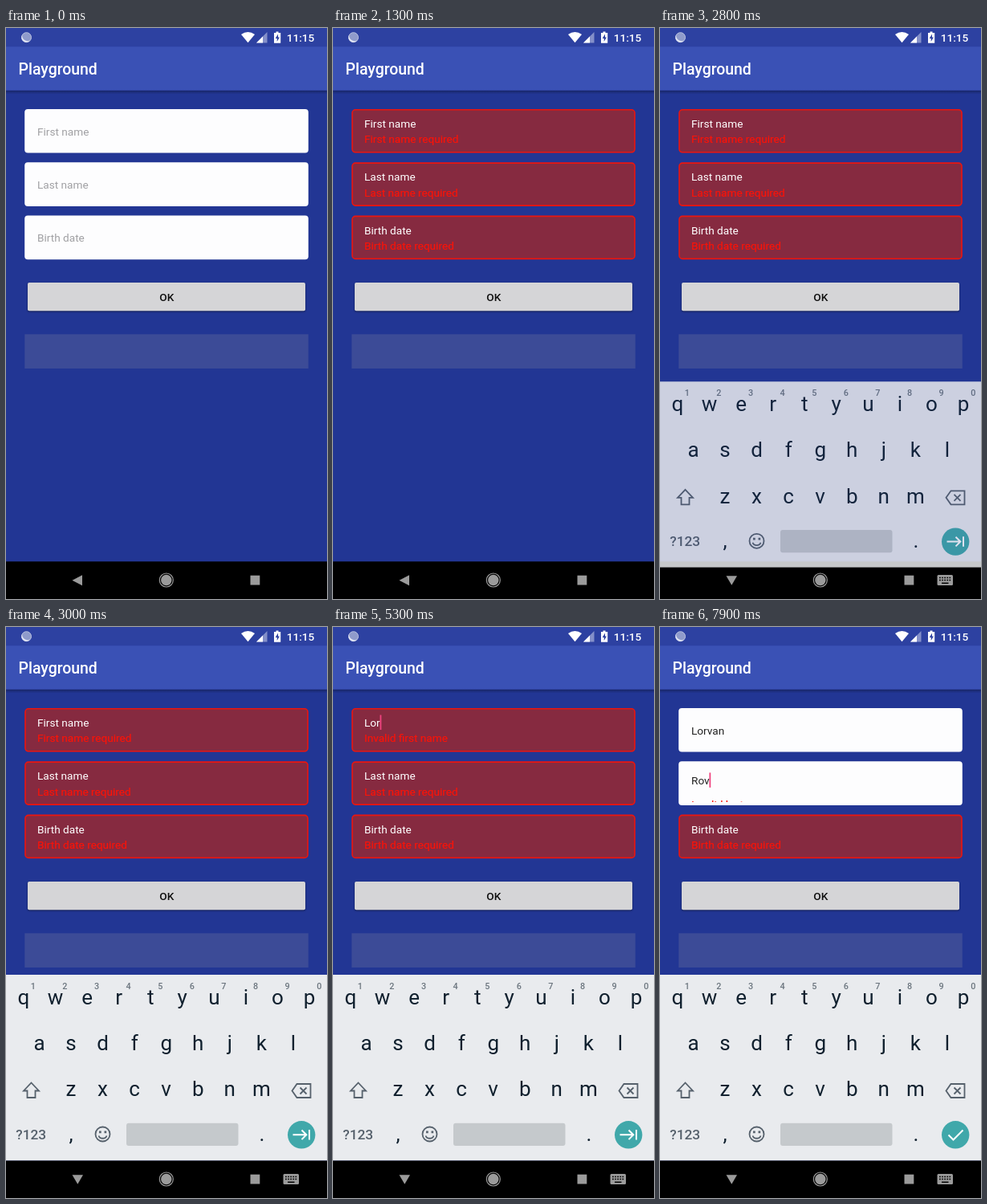
These frames come from a looping animation (400 by 711 pixels, 8000 ms). An HTML page:

```html
<!DOCTYPE html>
<html lang="en">
<head>
<meta charset="utf-8">
<title>Form validation</title>
<style>
html, body { margin: 0; width: 100%; height: 100%; overflow: hidden; background: #223694; }
svg { display: block; width: 100vw; height: 100vh; font-family: Roboto, sans-serif; font-size: 13.62px; }
.mid { text-anchor: middle; }
.bold { font-weight: 500; }
.line { fill: none; stroke: #56616c; stroke-width: 1.8; }
.white { fill: none; stroke: #fff; stroke-width: 2; }
</style>
</head>
<body>
<svg id="stage" viewBox="0 0 400 711">
  <defs>
    <linearGradient id="shade" x2="0" y2="1">
      <stop offset="0" stop-color="#000" stop-opacity=".32"/>
      <stop offset="1" stop-color="#000" stop-opacity="0"/>
    </linearGradient>
  </defs>
  <rect width="400" height="711" fill="#223694"/>
  <rect y="77.5" width="400" height="5" fill="url(#shade)"/>
  <rect y="23" width="400" height="54.7" fill="#3a51b5"/>
  <rect width="400" height="23.3" fill="#2d41a1"/>
  <text x="15.5" y="58" font-size="19.46" class="bold" fill="#fff">Playground</text>

  <circle cx="25.5" cy="11.7" r="6" fill="#8f9bcb" stroke="#b9c1e0"/>
  <path d="M20 9a6 6 0 0 0 10 6.500a7 7 0 0 1-10-6.500" fill="#e3e7f5"/>
  <path d="M301.500 18.300L293 8Q301.500 2 310 8Z" fill="#fff"/>
  <path d="M325.500 5V18.500H312Z" fill="#8490c9"/>
  <path d="M320 10.500V18.500H312Z" fill="#fff"/>
  <path d="M336.500 4.500h3v1.500h2.700v12.700h-8.200v-12.700h2.500z" fill="#fff"/>
  <path d="M339 7.500l-3.300 5.500h2v4l3.200-5.500h-1.900z" fill="#2d41a1"/>
  <text x="349.7" y="17" class="bold" fill="#fff">11:15</text>

  <g id="form"></g>
  <rect id="button" x="27" y="317" width="346" height="35.3" rx="2" fill="#d5d5d7"/>
  <text x="200.3" y="340" class="mid bold" fill="#111">OK</text>
  <rect x="23.300" y="381.300" width="353.500" height="42.700" fill="#3c4b97"/>

  <rect y="664.300" width="400" height="46.700" fill="#000"/>
  <g id="keys">
    <rect y="433" width="400" height="231.300" fill="#e9ebee"/>
    <g id="letters" fill="#10202e" font-size="26" class="mid"></g>
    <path class="line" d="M31.500 567.500L41 577.500H36.500V586H26.500V577.500H22Z"/>
    <path class="line" d="M362.500 569H379.500V586H362.500L356.500 577.500ZM366.500 573.500l8 8m0-8l-8 8"/>
    <text x="31.200" y="638" font-size="17.300" class="mid bold" fill="#56616c">?123</text>
    <circle class="line" cx="120.500" cy="631.500" r="9"/>
    <path class="line" d="M115.500 633.500a5.200 4.500 0 0 0 10 0"/>
    <path d="M116 627.500h2.700v2.700h-2.700zm6.500 0h2.700v2.700h-2.700z" fill="#56616c"/>
    <rect x="150" y="617.700" width="139.500" height="28.300" rx="3" fill="#c5c9cc"/>
    <circle cx="368.200" cy="632.300" r="17.200" fill="#40a8aa"/>
    <path id="next" class="white" d="M357.500 632.300H374M368.500 626.500l5.800 5.800l-5.800 5.800M378 626v12.500"/>
    <path id="done" class="white" d="M359.500 632.500l6 6L377.500 626.500"/>
  </g>
  <g fill="#9b9b9b">
    <path id="back" d="M95 681.300V694.300L82.500 687.800Z"/>
    <path id="down" d="M82.500 682.300H96L89.300 693.800Z"/>
    <circle cx="199.800" cy="687.500" r="6.700"/>
    <circle cx="199.800" cy="687.500" r="8.500" fill="none" stroke="#9b9b9b" stroke-width="1.200"/>
    <rect x="304.500" y="681.700" width="11.800" height="11.800"/>
    <g id="ime">
      <rect x="345.500" y="681" width="19.500" height="13" rx="1.500"/>
      <path d="M348 684.500h14.500M348 687.500h14.500" stroke="#000" stroke-width="1.500" stroke-dasharray="1.800 1.300"/>
      <path d="M351 691.300h8.500" stroke="#000" stroke-width="1.500"/>
    </g>
  </g>
  <circle id="touch" r="10.500" fill="#fff" fill-opacity=".38" stroke="#8a93b8" stroke-opacity=".35" stroke-width="1.500"/>
</svg>
<script>
const LOOP = 8000;
const $ = id => document.getElementById(id);
const clamp = v => Math.max(0, Math.min(1, v));
const span = (t, start, length) => clamp((t - start) / length);
const smooth = p => p * p * (3 - 2 * p);
const show = (node, on) => node.setAttribute('visibility', on ? 'inherit' : 'hidden');

function add(parent, tag, attrs, text) {
  const node = document.createElementNS('http://www.w3.org/2000/svg', tag);
  for (const key in attrs) node.setAttribute(key, attrs[key]);
  if (text) node.textContent = text;
  parent.append(node);
  return node;
}

const ERROR_AT = 650;
const OPEN_AT = 740;
const MOVE = 300;

// typed holds the time of each letter
const fields = [
  { label: 'First name', y: 101, value: 'Lorvan', typed: [3590, 3990, 5290, 5390, 5490, 5690],
    focus: 2300, blur: 6480, valid: 5380, close: 5420 },
  { label: 'Last name', y: 167.3, value: 'Rov', typed: [6990, 7190, 7490],
    focus: 6480, blur: LOOP, valid: 7690, close: 7740 },
  { label: 'Birth date', y: 233.6, value: '', typed: [],
    focus: LOOP, blur: LOOP, valid: LOOP, close: LOOP }
];

const taps = [
  { x: 223, y: 325, at: 490, end: 880 },
  { x: 75, y: 131, at: 2190, end: 2480 },
  { x: 58.5, y: 194.5, at: 6390, end: 6690 }
];

fields.forEach((f, i) => {
  const form = $('form');
  const clip = add(form, 'clipPath', { id: 'clip' + i });
  add(clip, 'rect', { x: 23, y: f.y, width: 354, height: 50.6 });
  f.box = add(form, 'rect', { rx: 4 });
  f.text = add(form, 'text', { x: 39 });
  const mask = add(form, 'g', { 'clip-path': `url(#clip${i})` });
  f.error = add(mask, 'text', { x: 39, fill: '#fa1409', stroke: '#fa1409', 'stroke-width': .2 });
  f.caret = add(form, 'rect', { width: 1.8, height: 18.5, fill: '#f0437f' });
});

function drawField(f, t) {
  const red = t >= ERROR_AT && t < f.valid;
  const inset = red ? .8 : 0;
  const box = {
    x: 23.2 + inset, y: f.y + inset, width: 353.6 - 2 * inset, height: 54.6 - 2 * inset,
    fill: red ? '#862a40' : '#fdfdfe', stroke: red ? '#ec150f' : 'none', 'stroke-width': 1.6
  };
  for (const key in box) f.box.setAttribute(key, box[key]);

  const count = f.typed.filter(at => t >= at).length;
  const value = f.value.slice(0, count);
  const shut = 1 - smooth(span(t, OPEN_AT, MOVE)) + smooth(span(t, f.close, 290));
  const base = f.y + 23.1 + 9.6 * shut;
  f.text.textContent = value || f.label;
  f.text.setAttribute('y', base);
  f.text.setAttribute('fill', red ? '#fff' : count ? '#222' : '#a0a0a3');

  f.error.textContent = count ? 'Invalid ' + f.label.toLowerCase() : f.label + ' required';
  f.error.setAttribute('y', f.y + 42.3 + 28.5 * shut);
  show(f.error, shut < 1);

  const last = count ? f.typed[count - 1] : f.focus;
  const focused = t >= f.focus && t < f.blur;
  show(f.caret, focused && (t - last) % 1000 < 500);
  f.caret.setAttribute('x', 38.8 + (count ? f.text.getComputedTextLength() : 0));
  f.caret.setAttribute('y', base - 14.6);
}

function letterRow(chars, x, y) {
  [...chars].forEach((c, i) => add($('letters'), 'text', { x: x + i * 39.55, y }, c));
}
letterRow('qwertyuiop', 22, 469.5);
letterRow('asdfghjkl', 41.5, 526.5);
letterRow('zxcvbnm', 81, 584.3);
add($('letters'), 'text', { x: 81, y: 640 }, ',');
add($('letters'), 'text', { x: 319, y: 640 }, '.');
[...'1234567890'].forEach((c, i) =>
  add($('letters'), 'text', { x: 33.8 + i * 39.6, y: 450.7, class: 'bold', 'font-size': 10.8, fill: '#6b757e' }, c));

function draw(t) {
  fields.forEach(f => drawField(f, t));

  const raised = smooth(span(t, 520, 130)) - smooth(span(t, 800, 350));
  $('button').style.filter =
    `drop-shadow(0 ${1 + raised * 1.5}px ${1 + raised * 1.5}px rgba(0,0,0,.45))`;

  const rise = 1 - (1 - span(t, 2660, 228)) ** 2;
  $('keys').setAttribute('transform', `translate(0 ${50 * (1 - rise)})`);
  $('keys').setAttribute('opacity', rise);
  const typing = t >= 2690;
  show($('back'), !typing);
  show($('down'), typing);
  show($('ime'), typing);
  show($('next'), t < 6480);
  show($('done'), t >= 6480);

  const tap = taps.find(p => t >= p.at && t < p.end);
  show($('touch'), tap);
  if (tap) {
    $('touch').setAttribute('cx', tap.x);
    $('touch').setAttribute('cy', tap.y);
    $('touch').setAttribute('opacity', 1 - span(t, tap.end - 130, 130));
  }
}

const begin = performance.now();
function tick() {
  draw((performance.now() - begin) % LOOP);
  requestAnimationFrame(tick);
}
tick();
</script>
</body>
</html>
```
